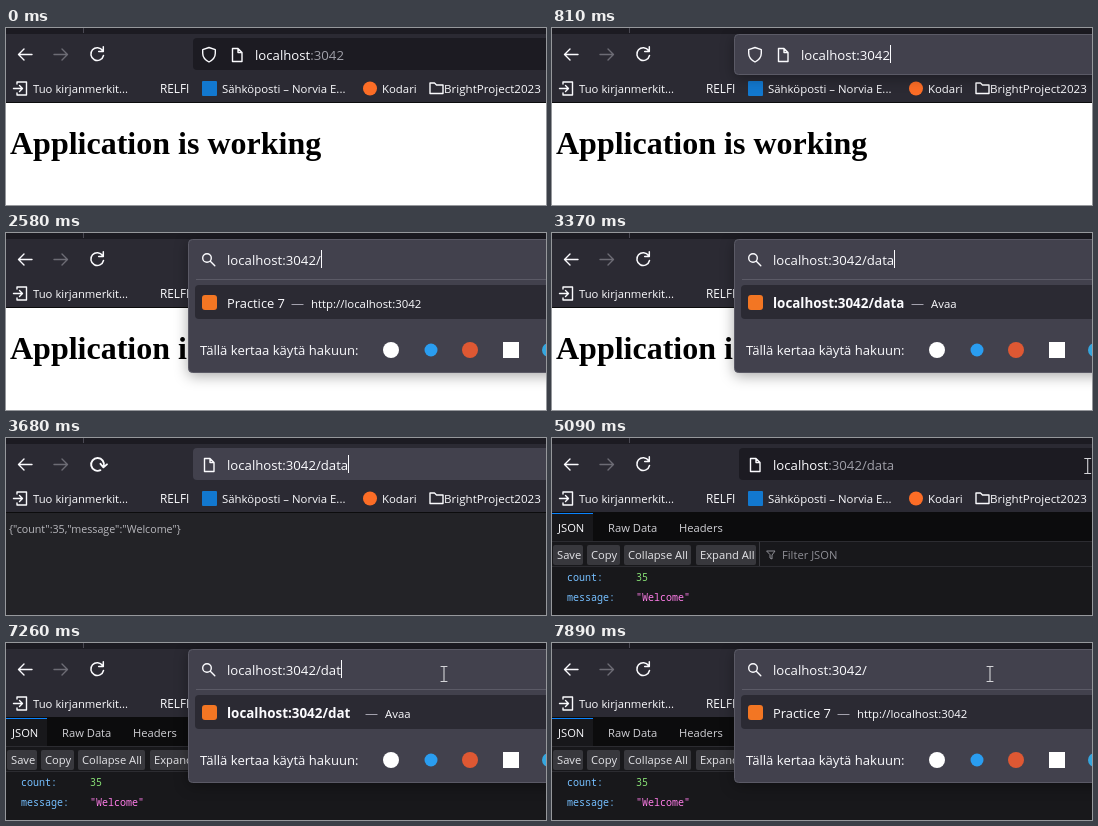
Animation, 540 px wide and 177 px high, one loop 8 s. Source, as an HTML page:

```html
<!DOCTYPE html>
<html lang="fi">
<head>
<meta charset="utf-8">
<title>Address bar demo</title>
<style>
html, body { margin: 0; width: 100%; height: 100%; overflow: hidden; background: #fff; }
svg { display: block; width: 540px; height: 177px; font-family: "Open Sans", "Noto Sans", sans-serif; }
.panel { filter: drop-shadow(0 3px 7px #0005); }
</style>
</head>
<body>
<svg id="stage" viewBox="0 0 540 177"></svg>
<script>
const LOOP = 8000, HOST = 'localhost', PORT = ':3042';
const LIGHT = '#fbfbfe', CYAN = '#00ddff', FIELD = '#42414d', TOOLBAR = '#2b2a33', DARK = '#1c1b22';
const stage = document.getElementById('stage');
const ruler = document.createElement('canvas').getContext('2d');

// Each cue overrides part of the state from its time on.
const cues = [
  [0, { page: 'hello', panel: '', path: '', icon: 'shield', focus: false, selected: false, caret: false }],
  [810, { focus: true, panel: 'bar', caret: true }],
  [860, { panel: 'history' }],
  [950, { selected: true, caret: false }],
  [1920, { selected: false, caret: true }],
  [2100, { caret: false }],
  [2480, { path: '/', panel: 'visited', icon: 'search', caret: true }],
  [2720, { path: '/d', panel: 'go' }],
  [3050, { path: '/da' }],
  [3210, { path: '/dat' }],
  [3350, { path: '/data' }],
  [3660, { panel: '', page: 'blank', icon: 'page', loading: true }],
  [3680, { page: 'raw' }],
  [3760, { page: 'json', focus: false, caret: false }],
  [3850, { loading: false }],
  [6050, { focus: true, panel: 'history', caret: true }],
  [6230, { selected: true, caret: false }],
  [6950, { selected: false, caret: true }],
  [7260, { path: '/dat', panel: 'go', icon: 'search' }],
  [7400, { path: '/da' }],
  [7540, { path: '/d' }],
  [7720, { path: '/', panel: 'visited' }],
  [7890, { caret: false }]
];

const rect = (x, y, w, h, fill, r = 0, more = '') =>
  `<rect x="${x}" y="${y}" width="${w}" height="${h}" rx="${r}" fill="${fill}" ${more}/>`;
const disc = (x, y, r, fill) => `<circle cx="${x}" cy="${y}" r="${r}" fill="${fill}"/>`;
const line = (d, color = LIGHT, width = 1.4, more = '') =>
  `<path d="${d}" fill="none" stroke="${color}" stroke-width="${width}" stroke-linecap="round" stroke-linejoin="round" ${more}/>`;
const text = (x, y, size, s, fill = LIGHT, more = '') =>
  `<text x="${x}" y="${y}" font-size="${size}" fill="${fill}" ${more}>${s}</text>`;

const mix = (a, b, k) => a + (b - a) * k;
const part = (t, from, to) => Math.min(1, Math.max(0, (t - from) / (to - from)));

function star(cx, cy) {
  const points = Array.from({ length: 10 }, (_, i) => {
    const r = i % 2 ? 2.9 : 6, a = i * Math.PI / 5 - Math.PI / 2;
    return (cx + r * Math.cos(a)).toFixed(1) + ',' + (cy + r * Math.sin(a)).toFixed(1);
  });
  return `<polygon points="${points.join(' ')}" fill="${CYAN}" stroke="${FIELD}"/>`;
}

const icons = {
  shield: () => line('M203 19.5l6.3 2.2v3.6c0 4-2.4 6.7-6.3 8.7-3.9-2-6.3-4.7-6.3-8.7v-3.6z'),
  page: x => line(`M${x - 4.5} 20.5h5.5l4 4v9h-9.5zM${x + 1} 20.5v4h4`),
  search: () => disc(201, 25, 4.3, 'none" stroke="#fbfbfe" stroke-width="1.4') + line('M204.3 28.3l4.5 4.5')
};

function toolbar(s) {
  const reload = line('M96.6 22.5a6.4 6.4 0 1 0 .9 5M97.3 18.8v4.6h-4.6', LIGHT, s.loading ? 1.9 : 1.5,
    s.loading ? 'transform="rotate(50 91 26.5)"' : '');
  return rect(0, 0, 540, 75, TOOLBAR) + rect(0, 0, 540, 6, DARK) + rect(77, 0, 1, 5, '#4a4953') +
    rect(0, 74, 540, 1, '#0c0c0d') +
    line('M26 26.5H12.5M18 21l-5.5 5.5L18 32') + line('M48 26.5h13.5M56 21l5.5 5.5L56 32', '#6d6c75') + reload +
    line('M11 56v-2h9.5v13H11v-2M7.5 60.5H16M13.5 57.5l3 3-3 3') + text(27, 65, 11.3, 'Tuo kirjanmerkit...') +
    text(154, 65, 11.8, 'RELFI') +
    rect(196, 53, 15, 15, '#1278cf', 1) + text(216, 65, 11.4, 'Sähköposti – Norvia E...') +
    disc(364, 60.5, 7, '#fc6d26') + text(376, 65, 11.4, 'Kodari') +
    line('M424 65.5v-10.5h4.5l2 2h6.5v8.5z') + text(438, 65, 11.6, 'BrightProject2023');
}

function button(x, w, label) {
  return rect(x, 107, w, 20, '#38383d', 2) + text(x + 4, 121, 11.2, label, '#e4e4e8');
}

function entry(y, key, value, color) {
  const mono = 'font-family="Noto Sans Mono, DejaVu Sans Mono, monospace"';
  return text(15, y, 10, key, '#75bfff', mono) + text(84, y, 10, value, color, mono);
}

const pages = {
  hello: () => rect(0, 75, 540, 102, '#fff') +
    text(4, 126, 32, 'Application is working', '#000', 'font-weight="700" font-family="Liberation Serif, serif"'),
  blank: () => rect(0, 75, 540, 102, '#232327'),
  raw: () => pages.blank() + text(3, 95, 10.7, '{"count":35,"message":"Welcome"}', '#b8b8bd'),
  json: () => rect(0, 75, 540, 102, '#18181b') + rect(0, 75, 540, 28, '#0c0c0d') +
    rect(0, 75, 41, 28, '#18181b') + rect(0, 75, 41, 1, '#0a84ff') + rect(0, 103, 540, 1, '#2c2c31') +
    text(6, 94, 11.2, 'JSON') + text(56, 94, 11.2, 'Raw Data', '#d0d0d5') + text(127, 94, 11.2, 'Headers', '#d0d0d5') +
    button(1, 30, 'Save') + button(35, 33, 'Copy') + button(72, 67, 'Collapse All') + button(144, 60, 'Expand All') +
    rect(207, 104, 1, 24, '#38383d') + rect(0, 128, 540, 1, '#2c2c31') +
    line('M215 113h8l-3 4v4l-2-1v-3z', '#8f8f96', 1) + text(230, 121, 11.2, 'Filter JSON', '#8f8f96') +
    entry(143, 'count:', '35', '#86de74') + entry(163, 'message:', '"Welcome"', '#ff7de9')
};

function visit(i, title, dashX, url, badge, icon) {
  const y = 75 + i * 36;
  return icon + (badge ? star(207.5, y + 2) : '') + text(221, y, 13.3, title) +
    text(dashX, y, 13, '—', '#a9a8b3') + text(dashX + 20, y - .5, 11.5, url, CYAN);
}

const history = () =>
  visit(0, 'Mail - Norvia Eetro - Postnox', 405, 'postnox.office.test/m', true, rect(196, 62, 15, 15, '#1278cf', 1)) +
  visit(1, 'Norv Luppon: Log in to the site', 420, 'moodle.jamk.fi/log', false, rect(195, 97, 16, 16, '#14124f')) +
  visit(2, 'Kirjekansioni (1 234) - domvik@a.example - Tumol', 533, '', true, rect(196, 135, 15, 12, '#ea4335', 1)) +
  visit(3, 'Puhelomo', 290, 'web.puhelomo.test', false, disc(203, 178, 8, '#25d366'));

function result(s) {
  const row = s.panel === 'go'
    ? [HOST + PORT + s.path, 'font-weight="700"', 'Avaa', 359, 379]
    : ['Practice 7', '', 'http://' + HOST + PORT, 285, 305];
  return rect(189, 52, 360, 34, TOOLBAR, 4) + rect(196, 62, 15, 15, '#f37623', 3) +
    text(221, 75, row[1] ? 13.4 : 12.9, row[0], LIGHT, row[1]) +
    text(row[3], 75, 13, '—', '#a9a8b3') + text(row[4], 74.5, 11.4, row[2]) +
    text(194, 122, 13.1, 'Tällä kertaa käytä hakuun:') +
    disc(385, 117, 8, '#fff') + disc(425, 117, 6.5, '#2a9df0') + disc(464, 117, 8, '#de5833') +
    rect(497, 109, 16, 16, '#fff') + disc(543, 117, 7, '#35a6de');
}

function addressBar(s) {
  const open = s.panel !== '';
  const height = { bar: 40, history: 190, visited: 133, go: 133 }[s.panel];
  const x = s.icon === 'shield' ? 249 : 221;
  const full = HOST + PORT + s.path;
  ruler.font = '13.2px "Open Sans", "Noto Sans", sans-serif';
  const width = ruler.measureText(full).width;
  let out = open
    ? rect(182.5, 6.5, 380, height, FIELD, 4, 'class="panel" stroke="#5b5a66"')
    : rect(187, 10, 380, 32, s.focus ? FIELD : DARK, 4);
  if (open && s.panel !== 'bar') out += rect(190, 46, 350, 1, '#5b5a66');
  if (s.icon === 'shield') out += icons.shield() + icons.page(231);
  else out += icons[s.icon](203);
  if (s.selected) out += rect(x, 17, width, 18, '#2b6f80');
  out += text(x, 31.5, 13.2, s.focus ? full : `${HOST}<tspan fill="#9f9fa8">${PORT}${s.path}</tspan>`);
  if (s.caret) out += rect(Math.round(x + width), 17, 1, 18, LIGHT);
  if (s.panel === 'history') out += history();
  else if (open && s.panel !== 'bar') out += result(s);
  return out;
}

function pointer(t) {
  if (t >= 90 && t < 430) {
    const k = part(t, 90, 430);
    return `<path transform="translate(${mix(512, 540, k)} ${mix(167, 108, k)})"
      d="M0 0v15l3.5-3.3 2.4 5.6 2.3-1-2.4-5.4h4.8z" fill="#fff" stroke="#000"/>`;
  }
  if (t < 5090) return '';
  const enter = 1 - (1 - part(t, 5090, 5810)) ** 2, drift = part(t, 6110, 6410);
  const x = mix(536, 432, enter) + 6 * drift, y = mix(28, 34, enter) - 3 * drift;
  const glow = t < 6010 ? 0 : 1 - part(t, 6150, 6410);
  return `<g transform="translate(${x} ${y})">` +
    (glow ? `<g opacity="${glow}">${disc(0, 0, 11.5, '#a59a24')}</g>` : '') +
    line('M-3-7.5h6M0-7.5v15M-3 7.5h6', '#d4d4d8', 1.1) + '</g>';
}

let shown = '';
function draw(now) {
  const t = now % LOOP;
  const s = Object.assign({}, ...cues.filter(c => c[0] <= t).map(c => c[1]));
  const picture = pages[s.page]() + toolbar(s) + addressBar(s) + pointer(t);
  if (picture !== shown) stage.innerHTML = shown = picture;
}

const start = performance.now();
function tick() {
  draw(performance.now() - start);
  requestAnimationFrame(tick);
}
tick();
</script>
</body>
</html>
```
